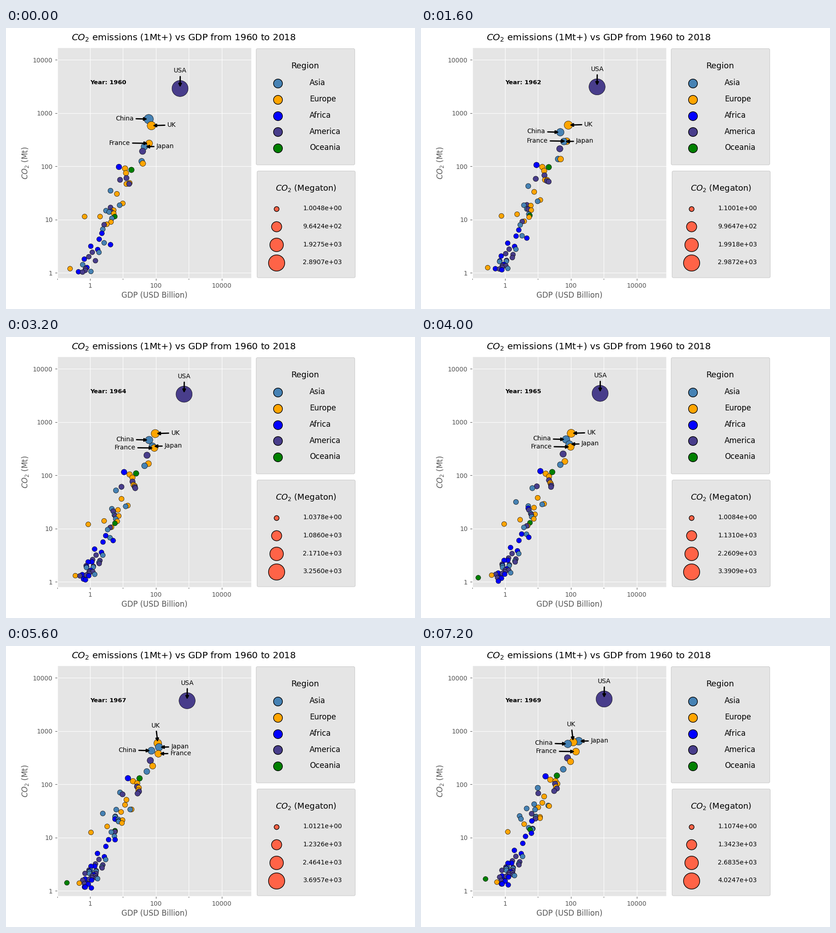
A matplotlib script that plays this animation: 900 px wide and 620 px high, repeating every 8 s.

```python
import matplotlib.pyplot as plt
import numpy as np
from matplotlib.animation import FuncAnimation
from matplotlib.patches import FancyBboxPatch

W, H, DPI = 900, 620, 100
YEARS = 10
LAST = YEARS - 1
PANEL = "#e5e5e5"
ASIA, EUROPE, AFRICA, AMERICA, OCEANIA = (
    "steelblue", "orange", "blue", "darkslateblue", "green")
PEAK = [2890.7, 2880.5, 2987.2, 3119.2, 3256.0, 3390.92, 3561.9, 3695.7, 3831.4, 4024.7]
LOW = [1.0048, 1.0195, 1.1001, 1.1844, 1.0378, 1.0084, 1.0231, 1.0121, 1.0378, 1.1074]

tracks = []   # (color, years, points)


def track(color, first, last, start=0, bends=None):
    """Add a country moving steadily from first to last, through optional bends."""
    stops = {start: first, **(bends or {}), LAST: last}
    tracks.append((color, list(stops), np.array(list(stops.values()), float)))
    return len(tracks) - 1


def place(index, year):
    _, years, points = tracks[index]
    return np.interp(year, years, points[:, 0]), np.interp(year, years, points[:, 1])


# Countries with a callout, in stage pixels
usa = track(AMERICA, (383, 133.5), (403, 117))
china = track(ASIA, (314, 201), (323, 216),
              bends={2: (306.5, 230), 5: (319, 226), 7: (320, 231)})
uk = track(EUROPE, (320, 215.5), (335, 212), bends={5: (330.5, 212.5), 7: (334, 214.5)})
france = track(EUROPE, (315, 254.5), (341, 233))
japan = track(ASIA, (304.5, 262), (347, 210), bends={2: (314.5, 250.5), 5: (326.5, 236.5)})

# Other large economies: where they begin and where they end
track(EUROPE, (301, 299), (329, 255))
track(EUROPE, (262, 310), (284.5, 295))
track(EUROPE, (264, 320), (296, 298))
track(EUROPE, (265, 344), (300, 304))
track(EUROPE, (272, 342), (297, 311))
track(EUROPE, (244, 366), (267, 346))
track(EUROPE, (257, 387), (282, 353))
track(EUROPE, (237, 402), (258, 356))
track(EUROPE, (237, 409), (262, 377))
track(EUROPE, (231, 428), (262, 380))
track(EUROPE, (222, 433), (245, 403))
track(EUROPE, (207, 416), (227, 393))
track(EUROPE, (173, 416), (191, 410))
track(EUROPE, (141, 531), (167, 521))
track(EUROPE, (262, 343), (271, 332), start=6)

track(ASIA, (298.5, 294), (313, 272))
track(ASIA, (250, 391), (280, 352))
track(ASIA, (230, 359), (257, 313))
track(ASIA, (220, 403), (249, 349))
track(ASIA, (227, 406), (253, 376))
track(ASIA, (233, 420), (252, 378))
track(ASIA, (216, 474), (245, 404))
track(ASIA, (213, 444), (237, 401))
track(ASIA, (209, 364), (217, 375), start=5)
track(ASIA, (240, 377), (251, 361), start=7)
track(ASIA, (230, 369), (232.5, 358.5), start=8)
track(ASIA, (218.5, 388.5), (220, 381.5), start=8)

track(AFRICA, (248.5, 306.5), (274, 287.5))
track(AFRICA, (236, 378), (244, 386), start=5)
track(AFRICA, (230, 478), (243, 413))
track(AFRICA, (211, 453), (230, 420))

track(AMERICA, (300.5, 272), (322.5, 247))
track(AMERICA, (251, 335), (258, 325))
track(AMERICA, (265, 331), (295, 304))
track(AMERICA, (271, 344), (299, 314.5))
track(AMERICA, (281, 339), (293, 320), start=2)
track(AMERICA, (230, 396), (243.5, 370))
track(AMERICA, (231, 405), (252, 381))
track(AMERICA, (216, 434), (246, 403))

track(OCEANIA, (276, 313), (299, 286))
track(OCEANIA, (239.5, 416), (240, 405))
track(OCEANIA, (126, 531), (142, 514), start=5)

# Small emitters: a band that drifts up while newcomers enter near the bottom
rng = np.random.default_rng(4)
mix = [AMERICA, AFRICA, AMERICA, ASIA, AFRICA]
for i in range(36):
    start = max(0, i // 3 - 4)
    y = rng.uniform(450 if start == 0 else 490, 540)
    x = 172 + 0.4 * (540 - y) + 16 * rng.uniform(-1, 1)
    span = LAST - start
    track(mix[i % len(mix)], (x, y), (x + 2.1 * span, y - 3.4 * span), start)

plt.rcParams.update({"axes.labelcolor": "#555555", "axes.labelsize": 12, "axes.edgecolor": "white",
                     "axes.linewidth": 1, "xtick.color": "#555555", "ytick.color": "#555555"})
fig = plt.figure(figsize=(W / DPI, H / DPI), dpi=DPI, facecolor="white")

# Log axes carry the grid and tick labels
ax = fig.add_axes([0.125, 0.11, 0.475, 0.82], facecolor=PANEL)
ax.set(xscale="log", yscale="log", xlim=(0.1, 8e4), ylim=(0.8, 17000),
       xlabel="GDP (USD Billion)", ylabel=r"$CO_2$ (Mt)")
decades = [10.0 ** k for k in range(-1, 5)]
ax.set_xticks(decades, ["", "1", "", "100", "", "10000"])
ax.set_yticks(decades[1:], [f"{d:.0f}" for d in decades[1:]])
ax.minorticks_off()
ax.grid(color="white", lw=0.8)
ax.set_axisbelow(True)
for tick in ax.xaxis.get_major_ticks()[::2]:
    tick.tick1line.set_markersize(2)

# A second layer in stage pixels holds everything else
stage = fig.add_axes([0, 0, 1, 1])
stage.set(xlim=(0, W), ylim=(H, 0))
stage.axis("off")


def label(x, y, text, size=10, ha="left", **kw):
    """Put text with the middle of its capitals at y."""
    return stage.text(x, y + 0.365 * size / 0.72, text, fontsize=size, ha=ha, va="baseline", **kw)


def panel(x0, y0, x1, y1):
    stage.add_patch(FancyBboxPatch((x0, y0), x1 - x0, y1 - y0, fc=PANEL, ec="#cccccc", lw=0.8,
                                   boxstyle="round,pad=0,rounding_size=3"))


def disc(x, y, size, color):
    stage.scatter([x], [y], s=size, c=[color], edgecolors="black", linewidths=1)


label(391, 20.5, r"$CO_2$ emissions (1Mt+) vs GDP from 1960 to 2018", 14.4, "center")
year_text = label(185.5, 119.2, "", 9.5, weight="bold")

panel(550.5, 45.5, 767.5, 302)
label(658, 82.7, "Region", 13, "center")
regions = [("Asia", ASIA), ("Europe", EUROPE), ("Africa", AFRICA),
           ("America", AMERICA), ("Oceania", OCEANIA)]
for i, (name, color) in enumerate(regions):
    disc(597.5, 122 + 35.8 * i, 200, color)
    label(668, 120.2 + 35.8 * i, name, 12)

panel(552.5, 315.5, 768.5, 551)
label(660, 352.7, r"$CO_2$ (Megaton)", 13, "center")
amounts = []
for i in range(4):
    disc(594.5, 398.5 + 39.7 * i, 60 + 200 * i, "tomato")
    amounts.append(label(653.5, 397.2 + 39.7 * i, ""))

dots = stage.scatter([], [], edgecolors="black", linewidths=0.5)


def callout(name):
    return stage.annotate(name, (0, 0), (0, 0), fontsize=10, ha="center", va="center",
                          arrowprops=dict(arrowstyle="-|>", color="black", lw=2))


notes = {i: callout(name) for i, name in
         [(usa, "USA"), (china, "China"), (uk, "UK"), (france, "France"), (japan, "Japan")]}


def offsets(year):
    return {usa: (0.5, -39), china: (-53, -1.5), japan: (46, -1),
            uk: (-4.5, -39) if year >= 7 else (44.5, -1.5),
            france: (49.5, -1) if year in (7, 8) else (-65, -1)}


def update(year):
    # Large emitters first, so smaller ones lie on top
    rows = [(*place(i, year), t[0]) for i, t in enumerate(tracks) if year >= t[1][0]]
    rows.sort(key=lambda r: r[1])
    xy = np.array([r[:2] for r in rows])
    co2 = 10 ** ((540.5 - xy[:, 1]) / 117.5)
    dots.set_offsets(xy)
    dots.set_sizes(60 + 600 * co2 / co2.max())
    dots.set_facecolors([r[2] for r in rows])

    for i, (dx, dy) in offsets(year).items():
        x, y = place(i, year)
        notes[i].xy = (x, y)
        notes[i].set_position((x + dx, y + dy))

    year_text.set_text(f"Year: {1960 + year}")
    for text, value in zip(amounts, np.linspace(LOW[year], PEAK[year], 4)):
        text.set_text(f"{value:.4e}")
    return [dots, year_text, *amounts, *notes.values()]


anim = FuncAnimation(fig, update, frames=YEARS, interval=800, repeat=True, repeat_delay=0)
plt.show()
```
